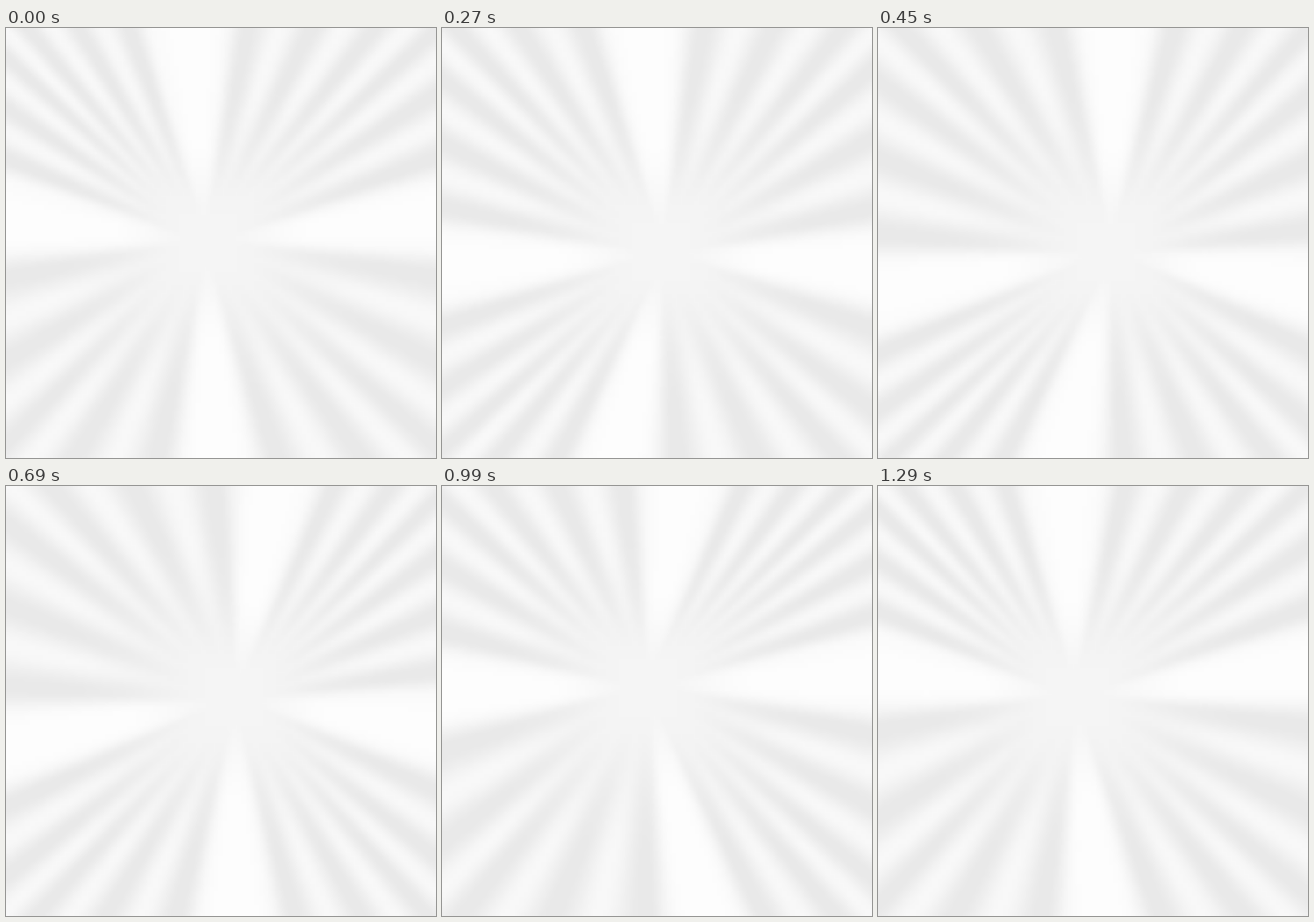
Write an HTML page with a canvas that moves like this. It is 490x490 px and loops after 1350 ms.

```html
<!DOCTYPE html>
<html lang="en">
<head>
<meta charset="utf-8">
<title>Soft rays</title>
<style>
  html, body { margin: 0; width: 100%; height: 100%; overflow: hidden; background: #fdfdfd; }
  canvas { display: block; width: 490px; height: 490px; }
</style>
</head>
<body>
<canvas id="stage" width="98" height="98"></canvas>
<script>
const SIZE = 490, CELL = 5, N = SIZE / CELL, EDGE = SIZE * 4, LOOP = 1350;
const WHITE = 253, CENTRE = 8, FILL = 12.5, RIPPLE = 8, SWAY = 50, MARGIN = 68;

// One white wedge per side: the phase of its sway, and the number of grey
// rays that fill the arc from it to the next wedge, clockwise.
const wedges = [
  { phase: 3.4, rays: 6 },
  { phase: 2.3, rays: 5 },
  { phase: 1.4, rays: 5 },
  { phase: -0.6, rays: 6 }
];

const ctx = document.getElementById("stage").getContext("2d");
const image = ctx.createImageData(N, N);
// Shading by place on the stage border, clockwise from the top left corner.
const fill = new Float32Array(EDGE), ripple = new Float32Array(EDGE);

const smooth = (a, b, x) => {
  const k = Math.min(1, Math.max(0, (x - a) / (b - a)));
  return k * k * (3 - 2 * k);
};

function shadeBorder(turn) {
  const spots = wedges.map((w, k) => 256 + 482 * k + SWAY * Math.cos(turn - w.phase));
  wedges.forEach(({ rays }, k) => {
    const from = spots[k], to = spots[k + 1] || spots[0] + EDGE;
    const period = (to - from - 2 * MARGIN) / (rays - 1);
    for (let s = Math.ceil(from); s < to; s++) {
      const gap = Math.min(s - from, to - s);
      const grey = smooth(18, 64, gap);
      fill[s % EDGE] = FILL * grey;
      ripple[s % EDGE] = RIPPLE * grey * Math.cos((s - from - MARGIN) / period * Math.PI * 2);
    }
  });
}

function draw(t) {
  const turn = t / LOOP * Math.PI * 2;
  shadeBorder(turn);
  const cx = 245 + 22 * Math.cos(turn - 2.5), cy = 243 + 14 * Math.sin(turn);
  for (let j = 0, p = 0; j < N; j++) {
    const dy = (j + 0.5) * CELL - cy || 0.01;
    const ky = (dy > 0 ? SIZE - cy : -cy) / dy;
    for (let i = 0; i < N; i++, p += 4) {
      const dx = (i + 0.5) * CELL - cx || 0.01;
      const kx = (dx > 0 ? SIZE - cx : -cx) / dx;
      // Follow the ray from the centre through this cell out to the border.
      const k = Math.min(kx, ky), x = cx + dx * k, y = cy + dy * k;
      const at = kx < ky
        ? (dx > 0 ? SIZE + y : EDGE - y)
        : (dy > 0 ? SIZE * 3 - x : x);
      const s = Math.floor(at + EDGE) % EDGE, far = 1 / k;
      const dark = CENTRE + (fill[s] - CENTRE) * smooth(0.05, 0.5, far)
        + ripple[s] * smooth(0.15, 0.8, far);
      image.data.fill(WHITE - dark, p, p + 3);
      image.data[p + 3] = 255;
    }
  }
  ctx.putImageData(image, 0, 0);
}

const start = performance.now();
function tick() {
  draw((performance.now() - start) % LOOP);
  requestAnimationFrame(tick);
}
tick();
</script>
</body>
</html>
```
